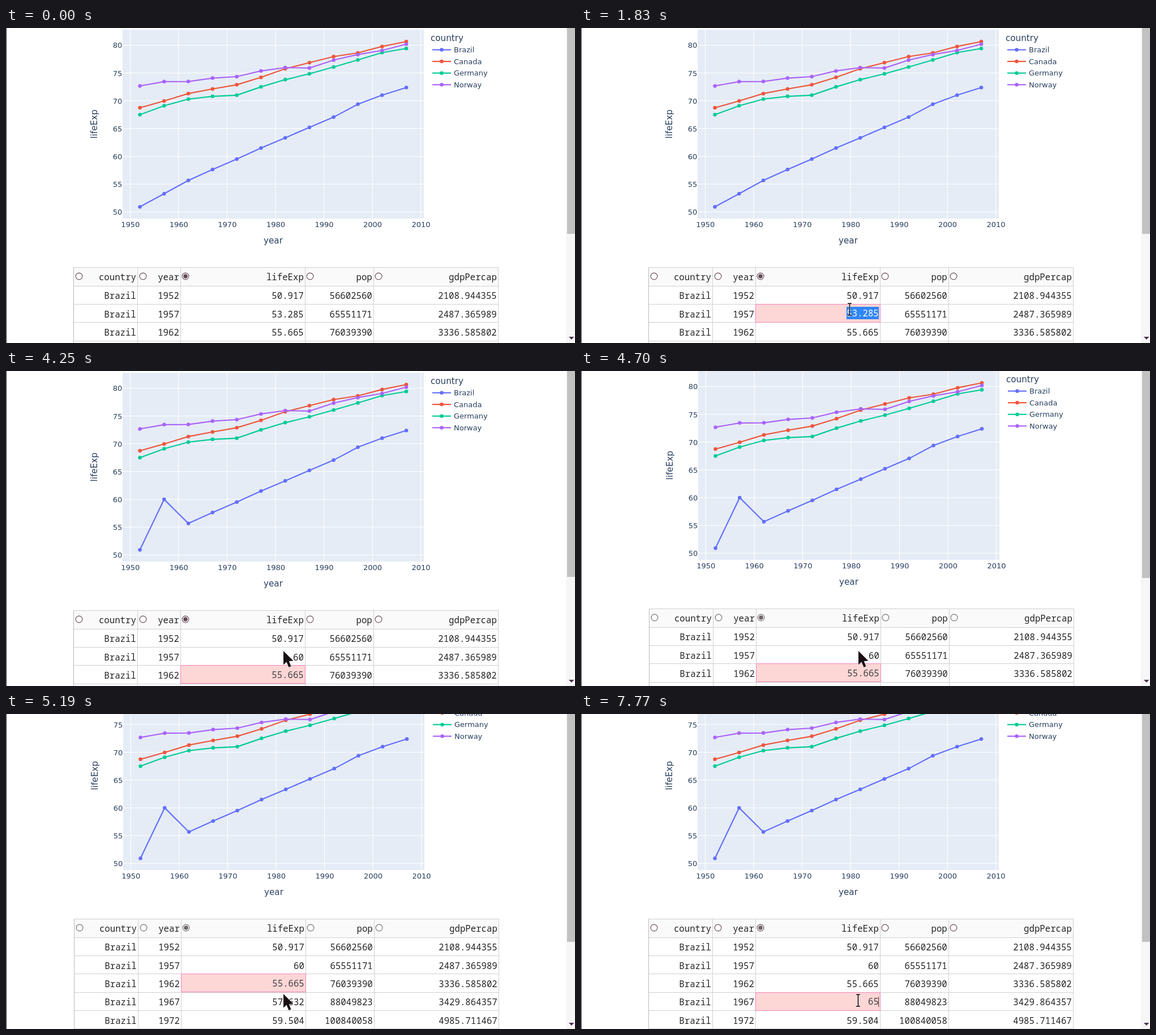
An HTML page that plays this animation: 1005 by 557 pixels, repeating every 8000 ms.

```html
<!DOCTYPE html>
<html lang="en">
<head>
<meta charset="utf-8">
<title>Editable table and chart</title>
<style>
  html, body { margin: 0; width: 100%; height: 100%; overflow: hidden; background: #fff; }
  svg { display: block; width: 1005px; height: 557px; }
  .chart text { font: 13px "DejaVu Sans", Verdana, sans-serif; fill: #2a3f5f; }
  .chart .title { font-size: 15.17px; }
  .table text { font: 15.7px "Noto Sans Mono", monospace; fill: #262626; text-anchor: end; }
</style>
</head>
<body>
<svg id="stage" viewBox="0 0 1005 557"></svg>
<script>
const LOOP = 8000, STEP = 67.5;
const stage = document.getElementById('stage');

function add(parent, tag, attrs = {}, text) {
  const el = document.createElementNS('http://www.w3.org/2000/svg', tag);
  set(el, attrs);
  if (text !== undefined) el.textContent = text;
  parent.appendChild(el);
  return el;
}
function set(el, attrs) {
  for (const k in attrs) el.setAttribute(k, attrs[k]);
}
function box(parent, x, y, width, height, fill) {
  return add(parent, 'rect', { x, y, width, height, fill });
}
function show(el, on) {
  el.style.display = on ? '' : 'none';
}

const page = add(stage, 'g');

// Chart
const chart = add(page, 'g', { class: 'chart' });
const px = year => 219.4 + (year - 1950) * 8.5545;
const py = v => 316.2 - (v - 50.917) * 9.827;
const series = [
  ['Brazil', '#636efa', [50.917, 53.285, 55.665, 57.632, 59.504, 61.489, 63.336, 65.205, 67.057, 69.388, 71.006, 72.39]],
  ['Canada', '#ef553b', [68.75, 69.96, 71.3, 72.13, 72.88, 74.21, 75.76, 76.86, 77.95, 78.61, 79.77, 80.653]],
  ['Germany', '#00cc96', [67.5, 69.1, 70.3, 70.8, 71, 72.5, 73.8, 74.847, 76.07, 77.34, 78.67, 79.406]],
  ['Norway', '#ab63fa', [72.67, 73.44, 73.47, 74.08, 74.34, 75.37, 75.97, 75.89, 77.32, 78.32, 79.05, 80.196]]
];

box(chart, 206, 3, 532, 334, '#e5ecf6');
for (let year = 1950; year <= 2010; year += 10) {
  box(chart, px(year) - 0.54, 3, 1.08, 334, '#fff');
  add(chart, 'text', { x: px(year) + 0.4, y: 351.6, 'text-anchor': 'middle' }, year);
}
for (let v = 50; v <= 80; v += 5) {
  box(chart, 206, py(v) - 0.54, 532, 1.08, '#fff');
  add(chart, 'text', { x: 205.3, y: py(v) + 5, 'text-anchor': 'end' }, v);
}
add(chart, 'text', { class: 'title', x: 472, y: 380.6, 'text-anchor': 'middle' }, 'year');
add(chart, 'text', { class: 'title', transform: 'translate(161 169.8) rotate(-90)', 'text-anchor': 'middle' }, 'lifeExp');
add(chart, 'text', { class: 'title', x: 750, y: 22.8 }, 'country');

const points = values => values.map((v, i) => [px(1952 + 5 * i), py(v)]);
const drawn = series.map(([name, color, values], i) => {
  const line = add(chart, 'polyline', {
    points: points(values).join(' '), fill: 'none', stroke: color, 'stroke-width': 2.17
  });
  const dots = points(values).map(([cx, cy]) => add(chart, 'circle', { cx, cy, r: 3.25, fill: color }));
  const y = 38.5 + i * 20.6;
  box(chart, 753, y - 1.08, 33, 2.17, color);
  add(chart, 'circle', { cx: 769.5, cy: y, r: 3.25, fill: color });
  add(chart, 'text', { x: 791, y: y + 4.7 }, name);
  return { line, dots };
});

// Table
const table = add(page, 'g', { class: 'table' });
const edges = [119, 232, 308, 528, 649, 869];
const heads = ['country', 'year', 'lifeExp', 'pop', 'gdpPercap'];
const pops = [56602560, 65551171, 76039390, 88049823, 100840058];
const gdps = ['2108.944355', '2487.365989', '3336.585802', '3429.864357', '4985.711467'];
const rowTop = i => Math.floor(456.2 + 32.3 * i);
const baseline = i => 479.4 + 32.3 * i;
const LINE = '#d0d0d0';

box(table, 119, 423, 750, 33, '#fafafa');
box(table, 119, 423, 751, 1, LINE);
for (let i = 0; i < 6; i++) box(table, 119, rowTop(i), 751, 1, LINE);
for (const x of edges) box(table, x, 423, 1, 240, LINE);
box(table, 119, 423, 1, 240, '#bbb');

const active = add(table, 'rect', {
  x: 308.5, width: 220, height: 32, fill: '#fdd6d6', stroke: '#f286ba'
});
const marked = box(table, 469, 0, 57, 22, '#2f86f6');

const cellX = c => edges[c + 1] - 2.2;
const radios = [129, 242, 317, 537, 658].map(cx =>
  add(table, 'circle', { cx, cy: 439, r: 5.9, fill: '#fff', 'stroke-width': 1.2 }));
const radioDot = add(table, 'circle', { cx: 317, cy: 439, r: 3.8 });
heads.forEach((name, c) => add(table, 'text', { x: cellX(c), y: 446 }, name));

const life = pops.map((pop, r) => {
  const cells = ['Brazil', 1952 + 5 * r, series[0][2][r], pop, gdps[r]];
  return cells.map((v, c) => add(table, 'text', { x: cellX(c), y: baseline(r) }, v))[2];
});
const caret = box(table, 525, 0, 1, 18, '#333');

// Scrollbar and window edge
box(stage, 989, 0, 16, 557, '#f6f6f6');
const thumb = box(stage, 991, 0, 14, 364, '#c1c1c1');
add(stage, 'path', { d: 'M994 546h9.5l-4.75 5z', fill: '#4f2f4f' });
box(stage, 0, 0, 1, 557, '#333');

// Pointers
const arrow = add(stage, 'path', {
  d: 'M0 0V24.5L5.5 19.5 9.5 29 13.5 27.2 9.8 18 17.5 17.5Z',
  fill: '#181014', stroke: '#fff', 'stroke-width': 1.4, 'paint-order': 'stroke'
});
const beam = add(stage, 'g', { fill: 'none' });
const beamPath = 'M-3.3 -10.3H-1Q0 -10.3 0 -9Q0 -10.3 1 -10.3H3.3M0 -9V9M-3.3 10.3H-1Q0 10.3 0 9Q0 10.3 1 10.3H3.3';
add(beam, 'path', { d: beamPath, stroke: '#fff', 'stroke-width': 3.2, opacity: 0.6 });
add(beam, 'path', { d: beamPath, stroke: '#181418', 'stroke-width': 1.7 });

// Latest value of a [time, value] list
function at(list, t) {
  let value = list[0][1];
  for (const [time, v] of list) if (t >= time) value = v;
  return value;
}

const activeRow = [[0, -1], [1550, 1], [3180, 2], [5660, 3]];
const selecting = [[0, 0], [1690, 1], [2510, 0], [5800, 1], [7570, 0]];
const typing = [[0, 0], [2510, 1], [3180, 0], [7570, 1]];
const edits = {
  1: [[0, '53.285'], [2510, '6'], [2770, '60']],
  3: [[0, '57.632'], [7570, '6'], [7770, '65']]
};
const plotted = [[0, 53.285], [3310, 60]];
const shift = [[0, 0], [4640, 1], [4770, 2], [5050, 1], [5390, 0]];

const pointers = [
  [0, null], [750, ['beam', 467.5, 508]], [1220, ['beam', 474.5, 497.5]],
  [3180, null],
  [3970, ['arrow', 478, 506]], [4040, ['arrow', 496, 519]], [4110, ['arrow', 502, 523]],
  [4180, ['arrow', 495, 506]], [4250, ['arrow', 490, 495]],
  [5390, null], [5460, ['beam', 489.5, 506.5]]
];

const stepped = (t, start) => start + Math.floor((t - start) / STEP) * STEP;

function pointer(t) {
  if (t < 130 || t >= 750) return at(pointers, t);
  const u = (stepped(t, 130) - 130) / 620;
  const p = u * (2 - u);
  const x = 787 - 319.5 * p;
  const y = 539 - 31 * p - 24 * Math.sin(Math.PI * p);
  const overText = x > 761 || (x > 568 && x < 648) || x < 527;
  return [overText ? 'beam' : 'arrow', x, y];
}

function scrollAt(t) {
  if (t < 4640) return 0;
  const p = Math.min(1, (stepped(t, 4640) - 4565) / 580);
  return Math.round(61 * p * p * (3 - 2 * p));
}

function render(t) {
  const scroll = scrollAt(t), dx = at(shift, t);
  set(page, { transform: `translate(${dx} ${-scroll})` });
  set(thumb, { height: 364 + Math.round(scroll * 0.635) });

  const values = series[0][2].slice();
  values[1] = at(plotted, t);
  set(drawn[0].line, { points: points(values).join(' ') });
  set(drawn[0].dots[1], { cy: py(values[1]) });

  const row = at(activeRow, t), sel = at(selecting, t), typed = at(typing, t);
  show(active, row >= 0);
  show(marked, sel);
  show(caret, typed);
  if (row >= 0) {
    set(active, { y: rowTop(row) + 0.5 });
    set(marked, { y: rowTop(row) + 5 });
    set(caret, { y: rowTop(row) + 8 });
  }
  life.forEach((el, r) => {
    const on = r === row;
    if (edits[r]) el.textContent = at(edits[r], t);
    set(el, { y: baseline(r) - (on ? 1.5 : 0) });
    el.style.fill = !on ? '' : sel ? '#fff' : '#454040';
  });

  const ring = dx ? '#767676' : '#70505f';
  radios.forEach(el => set(el, { stroke: ring }));
  set(radioDot, { fill: scroll ? '#6c6466' : '#5f4a56' });

  const p = pointer(t);
  show(arrow, p && p[0] === 'arrow');
  show(beam, p && p[0] === 'beam');
  if (p) set(p[0] === 'arrow' ? arrow : beam, { transform: `translate(${p[1]} ${p[2]})` });
}

const begin = performance.now();
function tick() {
  render((performance.now() - begin) % LOOP);
  requestAnimationFrame(tick);
}
tick();
</script>
</body>
</html>
```
